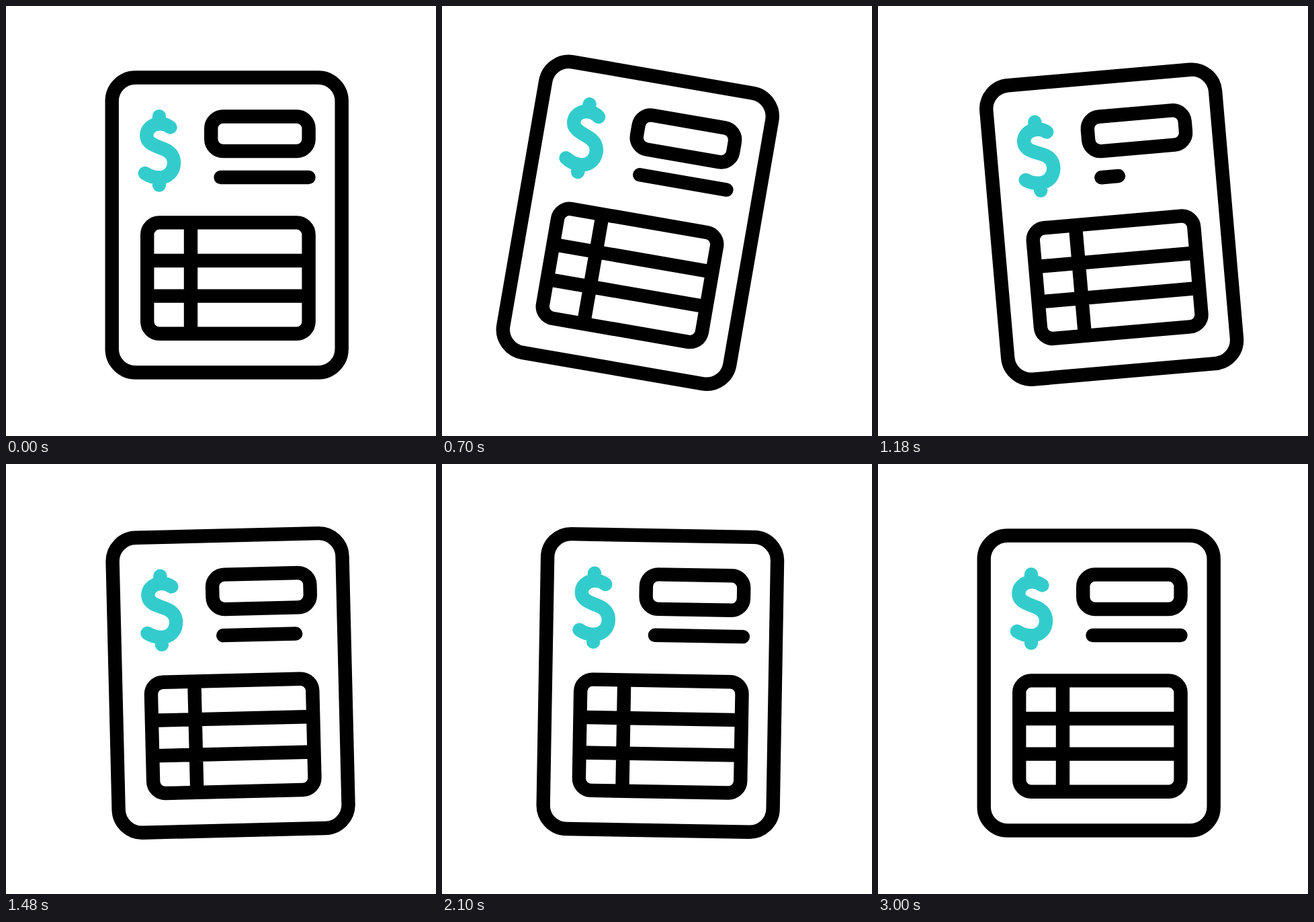
Write an HTML page that moves like this. It is 640 px wide and 640 px high and loops after 3420 ms.

```html
<!DOCTYPE html>
<html lang="en">
<head>
<meta charset="utf-8">
<title>Invoice swing</title>
<style>
  html, body { margin: 0; width: 100%; height: 100%; overflow: hidden; background: #fff; }
  svg { display: block; width: 100%; height: 100%; }
</style>
</head>
<body>
<svg viewBox="0 0 640 640" fill="none" stroke="#000" stroke-width="20.4">
  <g id="sheet">
    <rect x="157.7" y="106.5" width="342" height="439" rx="35"/>
    <rect x="305.2" y="164.5" width="145.4" height="51.5" rx="18"/>
    <path id="line" stroke-linecap="round"/>
    <rect x="210.2" y="322.4" width="240.4" height="165.3" rx="18"/>
    <path d="M275 322V488M210 379H450M210 431.6H450"/>
    <path stroke="#3cc" stroke-linecap="round" stroke-linejoin="round"
      d="M228 164.3V175M228 256V266.5M244.5 180.5C240 177 234 175 228 175.4C216.500 176 209.300 184 209.300 192.500C209.300 202 217 206 226 209.500L235 213C245 217 250 224 250 233C250 247 240 255.500 228 255.500C219 255.500 213 253 207 249"/>
  </g>
</svg>
<script>
  const LOOP = 3420, STEP = 20;
  const sheet = document.getElementById('sheet');
  const line = document.getElementById('line');

  // keys: [time, value] pairs, eased between neighbours
  const swing = [[0, 0], [600, 11], [1200, -5], [1800, 3], [2400, -1], [3000, 0]];
  const length = [[800, 1], [1200, 0.19], [1600, 1]];

  const ease = u => u * u * (3 - 2 * u);

  function valueAt(keys, t) {
    if (t <= keys[0][0]) return keys[0][1];
    const i = keys.findIndex(key => key[0] > t);
    if (i < 0) return keys[keys.length - 1][1];
    const [t0, a] = keys[i - 1], [t1, b] = keys[i];
    return a + (b - a) * ease((t - t0) / (t1 - t0));
  }

  const start = performance.now();

  function draw() {
    const now = Math.max(0, performance.now() - start) % LOOP;
    const t = now - now % STEP;
    sheet.setAttribute('transform', `rotate(${valueAt(swing, t)} 328.6 106.5)`);
    line.setAttribute('d', `M319.500 255h${131 * valueAt(length, t)}`);
    requestAnimationFrame(draw);
  }
  draw();
</script>
</body>
</html>
```
